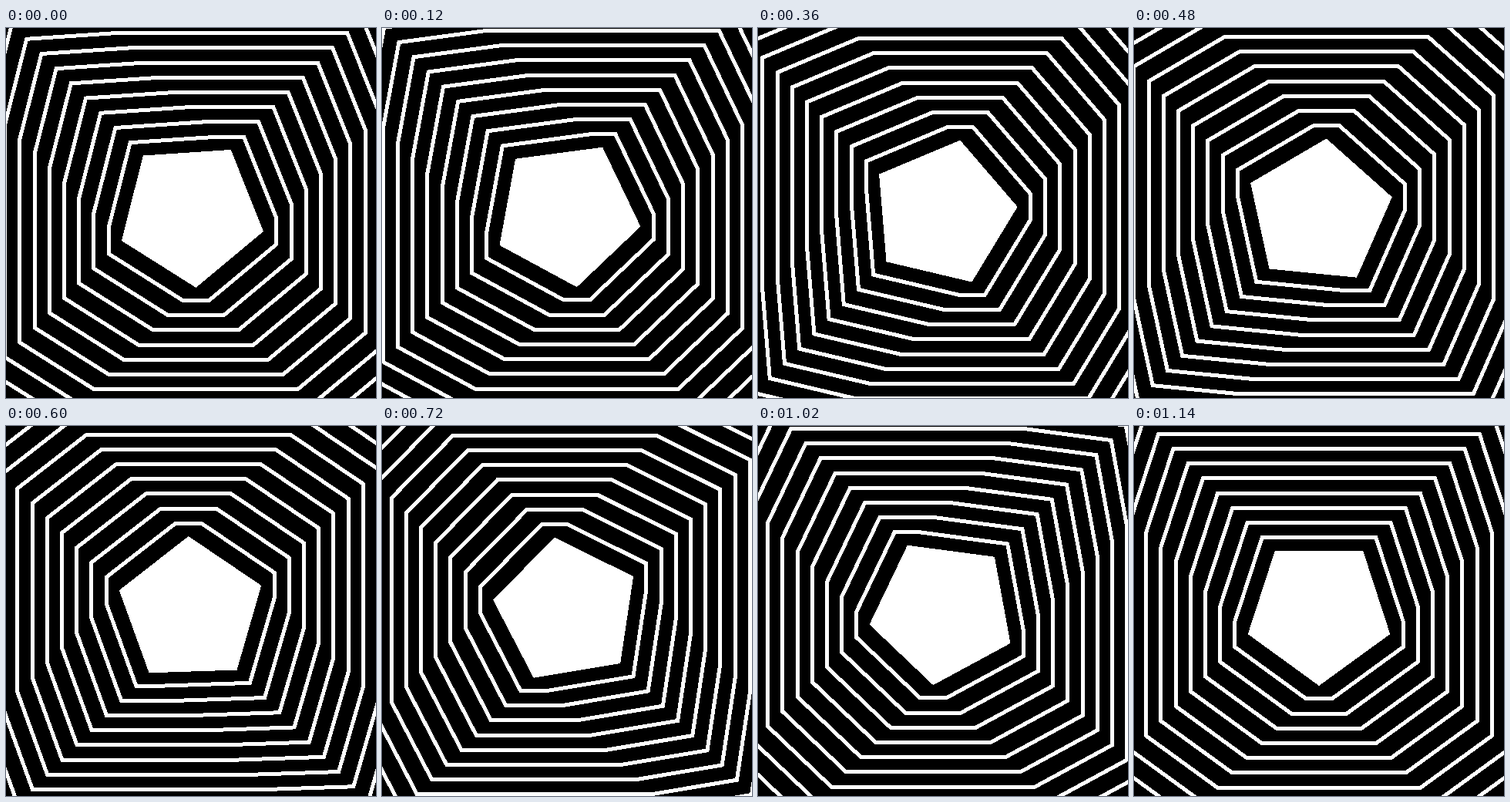
Animation of 480 by 480 pixels, one loop 1.2 s. Source, as an HTML page:

```html
<!DOCTYPE html>
<html lang="en">
<head>
<meta charset="utf-8">
<title>Turning pentagon</title>
<style>
  html, body { margin: 0; width: 100%; height: 100%; overflow: hidden; background: #000; }
  svg { display: block; width: 100%; height: 100%; }
</style>
</head>
<body>
<svg viewBox="-240 -240 480 480" shape-rendering="crispEdges">
  <path id="core" fill="#fff"/>
  <path id="rings" fill="none" stroke="#fff" stroke-width="5" stroke-miterlimit="10"/>
</svg>
<script>
const RADIUS = 97, FIRST = 16.8, GAP = 19.2, RINGS = 9;
const STEP = 60, LOOP = 1200, POSES = 19;
const core = document.getElementById('core');
const rings = document.getElementById('rings');
const rad = deg => deg * Math.PI / 180;
const range = n => [...Array(n).keys()];
const toPath = points => 'M' + points.map(p => p.map(v => v.toFixed(2))).join('L') + 'Z';

// Outline of the pentagon widened by a square of half-width s.
function outline(turn, s) {
  const normals = [
    ...range(5).map(k => (((turn + 36 + 72 * k) % 360) + 360) % 360),
    ...range(4).map(k => 90 * k)
  ].sort((a, b) => a - b);
  return normals.map((n, i) => {
    const mid = (n + (normals[i + 1] ?? 360 + normals[0])) / 2;
    const vertex = rad(turn + 72 * Math.round((mid - turn) / 72));
    return [
      RADIUS * Math.cos(vertex) + s * Math.sign(Math.cos(rad(mid))),
      RADIUS * Math.sin(vertex) + s * Math.sign(Math.sin(rad(mid)))
    ];
  });
}

function draw(now) {
  // The first pose is held for two steps.
  const pose = Math.max(1, Math.floor(now % LOOP / STEP));
  const turn = 90 - 72 * pose / POSES;
  core.setAttribute('d', toPath(outline(turn, 0)));
  rings.setAttribute('d', range(RINGS).map(k => toPath(outline(turn, FIRST + GAP * k))).join(''));
}

function tick() {
  draw(performance.now());
  requestAnimationFrame(tick);
}
tick();
</script>
</body>
</html>
```
